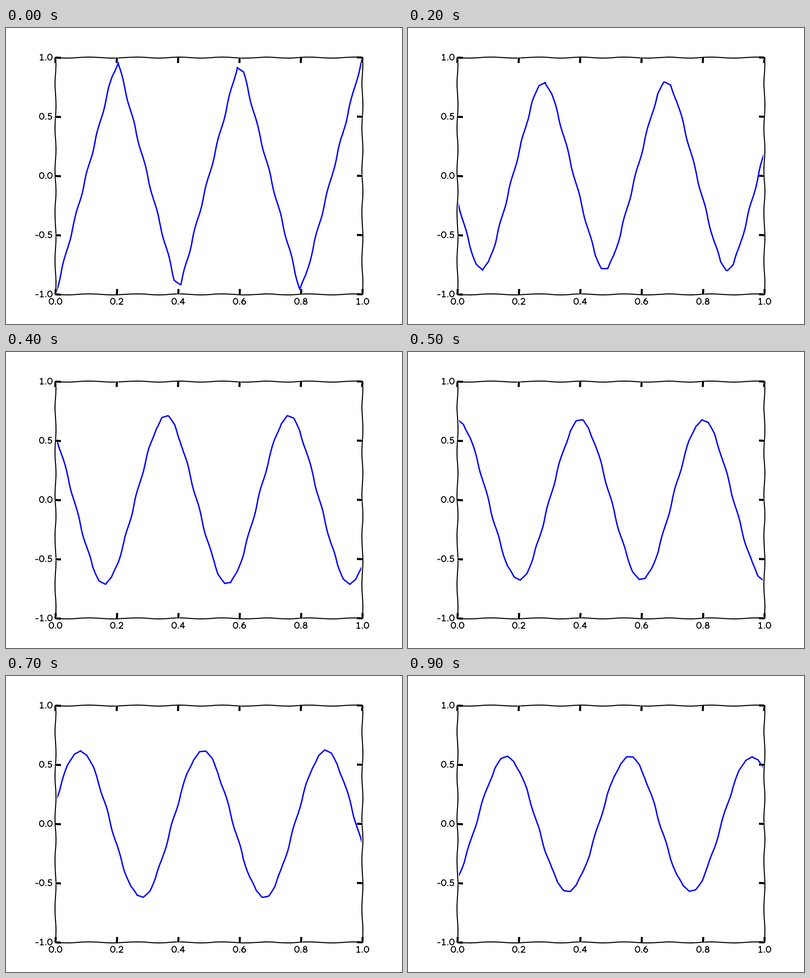
These frames come from a looping animation (800x600 px, 1000 ms). A matplotlib script:

```python
import numpy as np
import matplotlib.pyplot as plt
from matplotlib import patheffects
from matplotlib.animation import FuncAnimation
from matplotlib.lines import Line2D
from matplotlib.transforms import Affine2D

WIDTH, HEIGHT, DPI = 800, 600, 100
FRAMES, INTERVAL = 10, 100
PERIOD, DAMPING = 0.4, 0.0395
PX = 72 / DPI

plt.rcParams.update({
    "path.sketch": (1, 100, 2),
    "path.effects": [patheffects.withStroke(linewidth=4, foreground="w")],
    "axes.linewidth": 1.5,
    "axes.axisbelow": False,
    "lines.linewidth": 2.0,
})


def arc(cx, cy, rx, ry, start=0, end=360):
    """Points along an elliptic arc, angles in degrees."""
    t = np.radians(np.linspace(start, end, 40))
    return list(zip(cx + rx * np.cos(t), cy + ry * np.sin(t)))


# Pen strokes of the handwritten numerals, in pixels above the baseline.
GLYPHS = {
    "0": [arc(5.95, 6.8, 4.4, 5.9)],
    "1": [[(3.2, 10.6), (6.2, 12.6), (6.2, 0.9)], [(3.1, 0.9), (9.3, 0.9)]],
    "2": [arc(5.8, 9.2, 3.6, 3.5, 165, -35) + [(2.1, 0.9), (9.8, 0.9)]],
    "4": [[(8, 0.9), (8, 12.6), (1.6, 4.2), (10.4, 4.2)]],
    "5": [[(9.3, 12.6), (3.6, 12.6), (2.9, 7.2)]
          + arc(5.6, 4.6, 4.0, 3.7, 130, -145)],
    "6": [arc(8.6, 4.6, 6.4, 8.0, 100, 180) + arc(6, 4.6, 3.8, 3.7, 180, 540)],
    "8": [arc(6, 9.9, 2.9, 2.7), arc(6, 4.05, 3.8, 3.15)],
    ".": [[(2.3, 1.2), (2.31, 1.2)]],
    "-": [[(1.3, 5.3), (5.9, 5.3)]],
}


def advance(char):
    return {".": 4.6, "-": 7.4}.get(char, 11.9)


def text_width(text):
    return sum(map(advance, text))


def write(text, x, baseline):
    for char in text:
        for stroke in GLYPHS[char]:
            px, py = np.transpose(stroke)
            fig.add_artist(Line2D(
                px + x, py + baseline, color="k", transform=pixels,
                lw=(2.5 if char == "." else 1.9) * PX, snap=False,
                solid_capstyle="round", solid_joinstyle="round"))
        x += advance(char)


def wave(x, step):
    """Triangle wave that drifts right while diffusion rounds it off."""
    n = np.arange(1, 400, 2)[:, None]
    phase = 2 * np.pi * (x - PERIOD * step / FRAMES) / PERIOD
    terms = np.cos(n * phase) * np.exp(-DAMPING * step * n**2) / n**2
    return -8 / np.pi**2 * terms.sum(axis=0)


fig = plt.figure(figsize=(WIDTH / DPI, HEIGHT / DPI), dpi=DPI, facecolor="w")
pixels = Affine2D().scale(1 / WIDTH, 1 / HEIGHT) + fig.transFigure
ax = fig.add_axes([0.125, 0.1, 0.775, 0.8])
xticks, yticks = np.linspace(0, 1, 6), np.linspace(-1, 1, 5)
ax.set(xlim=(0, 1), ylim=(-1, 1), xticks=xticks, yticks=yticks)
ax.tick_params(direction="in", length=8, width=3, top=True, right=True,
               labelbottom=False, labelleft=False)

with plt.rc_context({"path.sketch": None, "path.effects": []}):
    for tick in xticks:
        label = f"{tick:.1f}"
        write(label, 100 + 620 * tick - text_width(label) / 2, 39.2)
    for tick in yticks:
        label = f"{tick:.1f}"
        write(label, 94.6 - text_width(label), 300 + 240 * tick - 5.8)

xs = np.linspace(0, 1, 50)
line, = ax.plot(xs, wave(xs, 0), color="b")


def update(step):
    line.set_ydata(wave(xs, step))
    return line,


anim = FuncAnimation(fig, update, frames=FRAMES, interval=INTERVAL,
                     repeat=True, repeat_delay=0, blit=False)
plt.show()
```
